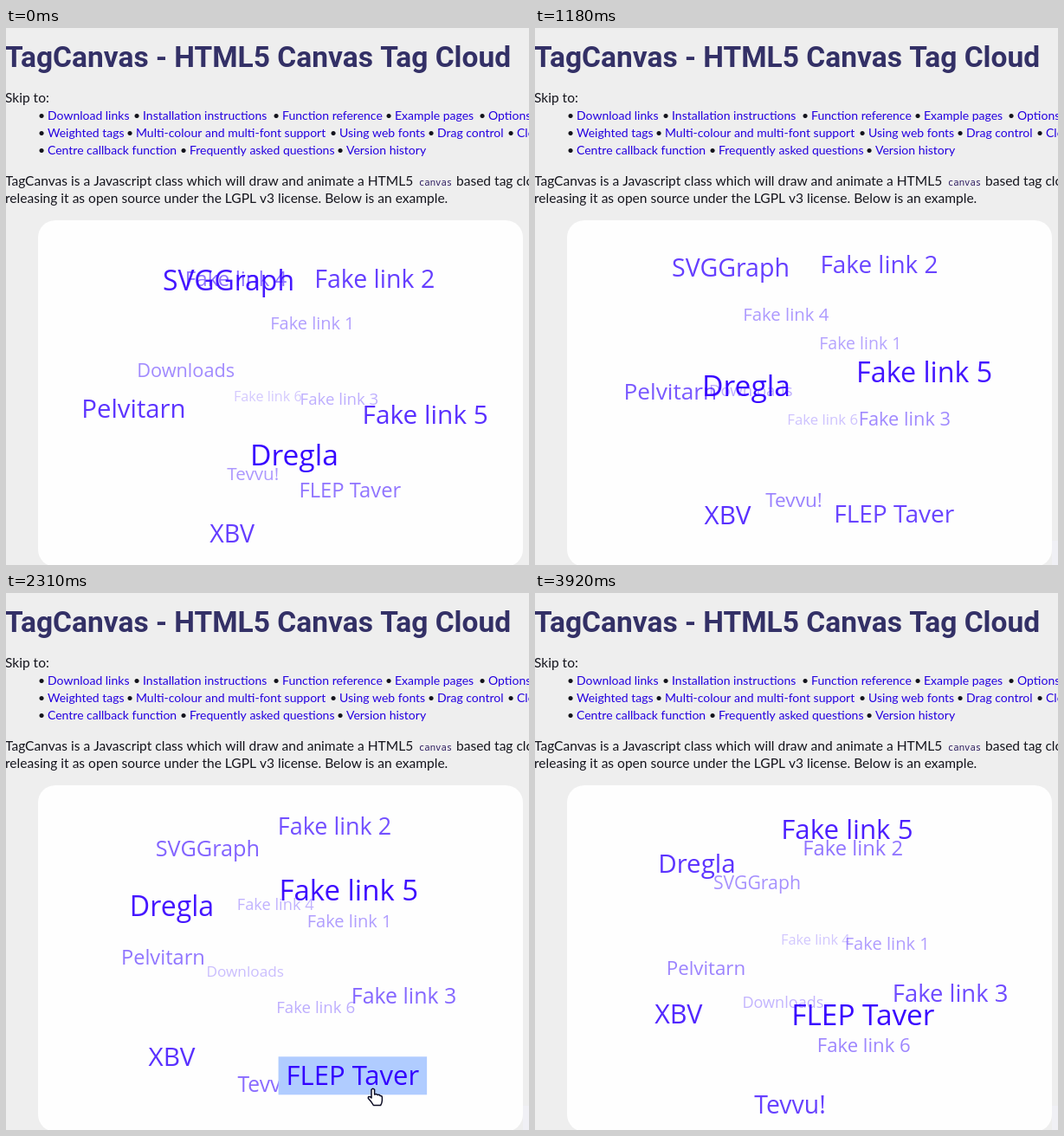
Write an HTML page with a canvas that moves like this. It is 604 by 620 pixels and loops after 3.99 s.

```html
<!DOCTYPE html>
<html lang="en">
<head>
<meta charset="utf-8">
<title>TagCanvas</title>
<style>
  html, body { margin: 0; width: 100%; height: 100%; overflow: hidden; background: #eee; }
  canvas { display: block; }
</style>
</head>
<body>
<canvas id="stage" width="604" height="620"></canvas>
<script>
const ctx = document.getElementById('stage').getContext('2d');
const LOOP = 3990, STEP = 70;
const CENTRE = { x: 317, y: 422 }, RADIUS = 150;
const LINK = '#2400e0', TAG = '#30f';

// Each tag is a point on the unit sphere; z points at the viewer.
const tags = [
  ['Fake link 1', .345, -.755, -.56],
  ['Fake link 2', .585, -.71, .392],
  ['Fake link 3', .7, .061, -.711],
  ['Fake link 4', -.362, -.931, -.095],
  ['Fake link 5', .836, .12, .535],
  ['Fake link 6', -.182, .036, -.983],
  ['SVGGraph', -.267, -.579, .771],
  ['Downloads', -.904, -.223, -.364],
  ['Pelvitarn', -.871, .092, .482],
  ['Dregla', .065, .29, .955],
  ['Tevvu!', -.284, .825, -.49],
  ['FLEP Taver', .579, .803, -.135],
  ['XBV', -.299, .866, .402]
];

// Time in ms, turned angle in degrees, speed in degrees per second
const spin = [
  [0, 0, 32], [490, 14.5, 27], [1190, 28.7, 14], [1750, 34, 6],
  [1750, 34, 27], [2310, 51, 30], [2800, 64.6, 25], [3990, 78.5, 3]
];
const TURN = 51;                                  // angle at which the axis changes
const AXIS_1 = [.668, -.744], AXIS_2 = [.938, -.347];

// Time, x, y of the pointer tip
const pointer = [[1700, 605, 537], [1750, 592, 540], [2240, 427, 564],
                 [2310, 422, 572], [2450, 422, 575], [2680, 422, 622]];

function segment(keys, t) {
  const i = keys.findIndex((k, n) => n && t < k[0]);
  return i < 0 ? null : [keys[i - 1], keys[i]];
}

function angleAt(t) {
  const [[t0, a, va], [t1, b, vb]] = segment(spin, t);
  const d = (t1 - t0) / 1000, s = (t - t0) / (t1 - t0), r = 1 - s;
  return r * r * ((1 + 2 * s) * a + s * d * va) + s * s * ((1 + 2 * r) * b - r * d * vb);
}

function pointerAt(t) {
  if (t < pointer[0][0]) return null;
  const pair = segment(pointer, t);
  if (!pair) return null;
  const [a, b] = pair, s = (t - a[0]) / (b[0] - a[0]);
  return { x: a[1] + s * (b[1] - a[1]), y: a[2] + s * (b[2] - a[2]) };
}

function rotate([x, y, z], [ax, ay], degrees) {
  const angle = degrees * Math.PI / 180, c = Math.cos(angle), s = Math.sin(angle);
  const along = (ax * x + ay * y) * (1 - c);
  return [x * c + ay * z * s + ax * along,
          y * c - ax * z * s + ay * along,
          z * c + (ax * y - ay * x) * s];
}

function write(text, x, y, font, color) {
  ctx.font = font;
  ctx.fillStyle = color;
  ctx.fillText(text, x, y);
}

function drawPage(t) {
  ctx.fillStyle = '#eee';
  ctx.fillRect(0, 0, 604, 620);
  if (t >= 490) {
    ctx.fillStyle = '#f0f0f5';
    ctx.fillRect(597, 592, 7, 28);
  }
  ctx.fillStyle = '#fefefe';
  ctx.beginPath();
  ctx.roundRect(37, 222, 560, 400, 20);
  ctx.fill();

  ctx.textAlign = 'left';
  const body = '15.55px Lato, sans-serif', small = '14px Lato, sans-serif', ink = '#14141c';
  write('TagCanvas - HTML5 Canvas Tag Cloud', -1, 45, 'bold 33.5px Roboto, sans-serif', '#333066');
  write('Skip to:', -1, 86, body, ink);
  [
    [[48, 'Download links'], [158, 'Installation instructions'], [319, 'Function reference'],
     [449, 'Example pages'], [557, 'Options']],
    [[48, 'Weighted tags'], [150, 'Multi-colour and multi-font support'], [385, 'Using web fonts'],
     [498, 'Drag control'], [590, 'Cloud shapes']],
    [[48, 'Centre callback function'], [212, 'Frequently asked questions'], [393, 'Version history']]
  ].forEach((row, i) => row.forEach(([x, label]) => {
    write('•', x - 11, 106 + 20 * i, small, ink);
    write(label, x, 106 + 20 * i, small, LINK);
  }));
  write('TagCanvas is a Javascript class which will draw and animate a HTML5', -1, 182, body, ink);
  write('canvas', 477, 182, '10.6px "Noto Sans Mono", monospace', '#2b1a5e');
  write('based tag cloud. I am', 520, 182, body, ink);
  write('releasing it as open source under the LGPL v3 license. Below is an example.', -1, 202, body, ink);
}

function drawCloud(angle, tip) {
  ctx.textAlign = 'center';
  tags.map(([label, ...p]) => {
    p = rotate(p, AXIS_1, Math.min(angle, TURN));
    return [label, ...rotate(p, AXIS_2, Math.max(angle - TURN, 0))];
  }).sort((a, b) => a[3] - b[3]).forEach(([label, px, py, pz]) => {
    const scale = RADIUS * Math.exp(.57 * pz - .06 * pz * pz), size = 25 + 9 * pz;
    const x = CENTRE.x + px * scale, y = CENTRE.y + py * scale;
    ctx.font = `500 ${size}px "Open Sans", sans-serif`;
    const half = ctx.measureText(label).width / 2 + 9;
    const hot = tip && Math.abs(tip.x - x) < half && Math.abs(tip.y - y) < 22;
    if (hot) {
      ctx.fillStyle = '#b0ccff';
      ctx.fillRect(x - half, y - 22, half * 2, 44);
      tip.hand = true;
    }
    ctx.globalAlpha = hot ? 1 : .6 + .4 * pz;
    write(label, x, y + .357 * size, ctx.font, TAG);
    ctx.globalAlpha = 1;
  });
}

const arrow = new Path2D('M.7 .7V18L4.5 14.5H12Z');
const hand = new Path2D('M0 1.5Q1.8-1 3.6 1.5V7Q6 5.6 7.2 7.6Q9.4 6.8 10.2 8.6Q12.4 8.2 12.4 10.6V14' +
                        'Q12.2 17 10.6 19.5H2.4Q.5 16-3.6 11.6Q-4.2 8.6-1.2 9.8L0 11Z');

function drawPointer({ x, y, hand: overTag }) {
  const shape = overTag ? hand : arrow;
  ctx.save();
  ctx.translate(x, y);
  ctx.lineJoin = 'round';
  ctx.lineWidth = 1.5;
  ctx.fillStyle = '#fff';
  ctx.strokeStyle = '#0c0c24';
  ctx.fill(shape);
  ctx.stroke(shape);
  ctx.restore();
}

function frame() {
  const t = Math.floor((performance.now() % LOOP + 10) / STEP) * STEP % LOOP;
  const tip = pointerAt(t);
  drawPage(t);
  drawCloud(angleAt(t), tip);
  if (tip) drawPointer(tip);
  requestAnimationFrame(frame);
}
frame();
</script>
</body>
</html>
```
